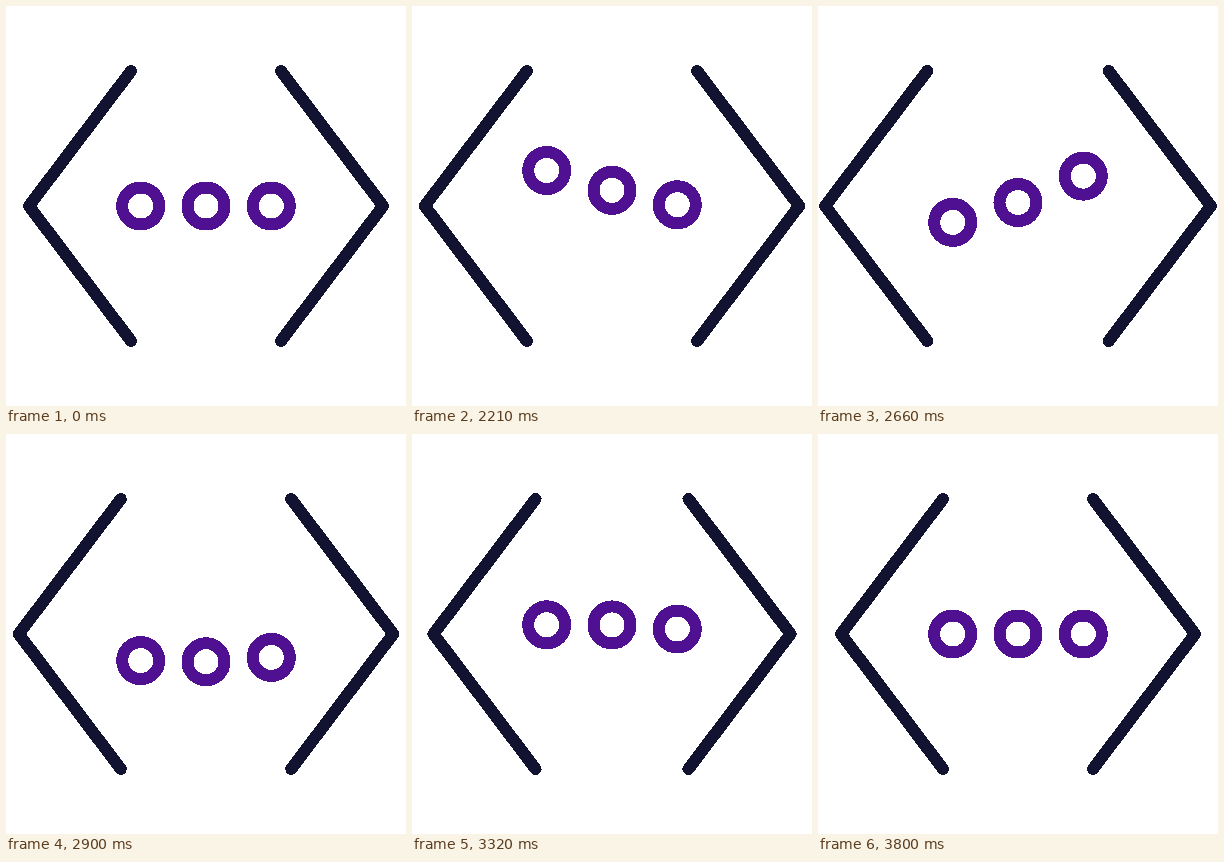
Recreate the animation shown at these times as an HTML page. Size 400 by 400 pixels, loop 3830 ms.

```html
<!DOCTYPE html>
<html lang="en">
<head>
<meta charset="utf-8">
<title>Code brackets</title>
<style>
  html, body { margin: 0; width: 100%; height: 100%; overflow: hidden; background: #fff; }
  svg { display: block; width: 100vw; height: 100vh; }
  svg * { fill: none; stroke-width: 12; stroke-linecap: round; stroke-linejoin: round; shape-rendering: crispEdges; }
  path { stroke: #121331; }
  circle { stroke: #4f1091; }
</style>
</head>
<body>
<svg viewBox="0 0 400 400">
  <path id="left" d="M125 65 23 200 125 335"/>
  <path id="right" d="M275 65 377 200 275 335"/>
  <circle cx="134.7" cy="200" r="18.5"/>
  <circle cx="200" cy="200" r="18.5"/>
  <circle cx="265.3" cy="200" r="18.5"/>
</svg>
<script>
  const LOOP = 3830, REST = 2000, STEP = 30, DELAY = 3;
  const left = document.getElementById("left");
  const right = document.getElementById("right");
  const dots = document.querySelectorAll("circle");

  // Ease with flat ends; a and b are the x positions of the two handles.
  function ease(p, a, b) {
    let lo = 0, hi = 1;
    for (let i = 0; i < 24; i++) {
      const s = (lo + hi) / 2, r = 1 - s;
      if (3 * r * r * s * a + 3 * r * s * s * b + s * s * s < p) lo = s; else hi = s;
    }
    return lo * lo * (3 - 2 * lo);
  }

  // Each key: [step, value, handle a, handle b]; the handles shape the way to that key.
  function track(keys, n) {
    if (n <= keys[0][0]) return keys[0][1];
    for (let i = 1; i < keys.length; i++) {
      const [n0, v0] = keys[i - 1], [n1, v1, a, b] = keys[i];
      if (n < n1) return v0 + (v1 - v0) * ease((n - n0) / (n1 - n0), a, b);
    }
    return keys[keys.length - 1][1];
  }

  const spread = [[0, 0], [19, 16, .4, .1], [60, 0, .4, .1]];
  const bounce = [[0, 0], [10.5, -48, .33, .67], [28, 28, .45, .4], [42.5, -9.5, .45, .4], [54, 0, .45, .4]];

  function draw(now) {
    const n = Math.max(0, Math.floor((now % LOOP - REST) / STEP));
    const x = track(spread, n);
    left.setAttribute("transform", `translate(${-x} 0)`);
    right.setAttribute("transform", `translate(${x} 0)`);
    dots.forEach((dot, i) => dot.setAttribute("cy", 200 + track(bounce, n - i * DELAY)));
  }

  const start = performance.now();
  function tick() {
    draw(performance.now() - start);
    requestAnimationFrame(tick);
  }
  tick();
</script>
</body>
</html>
```
